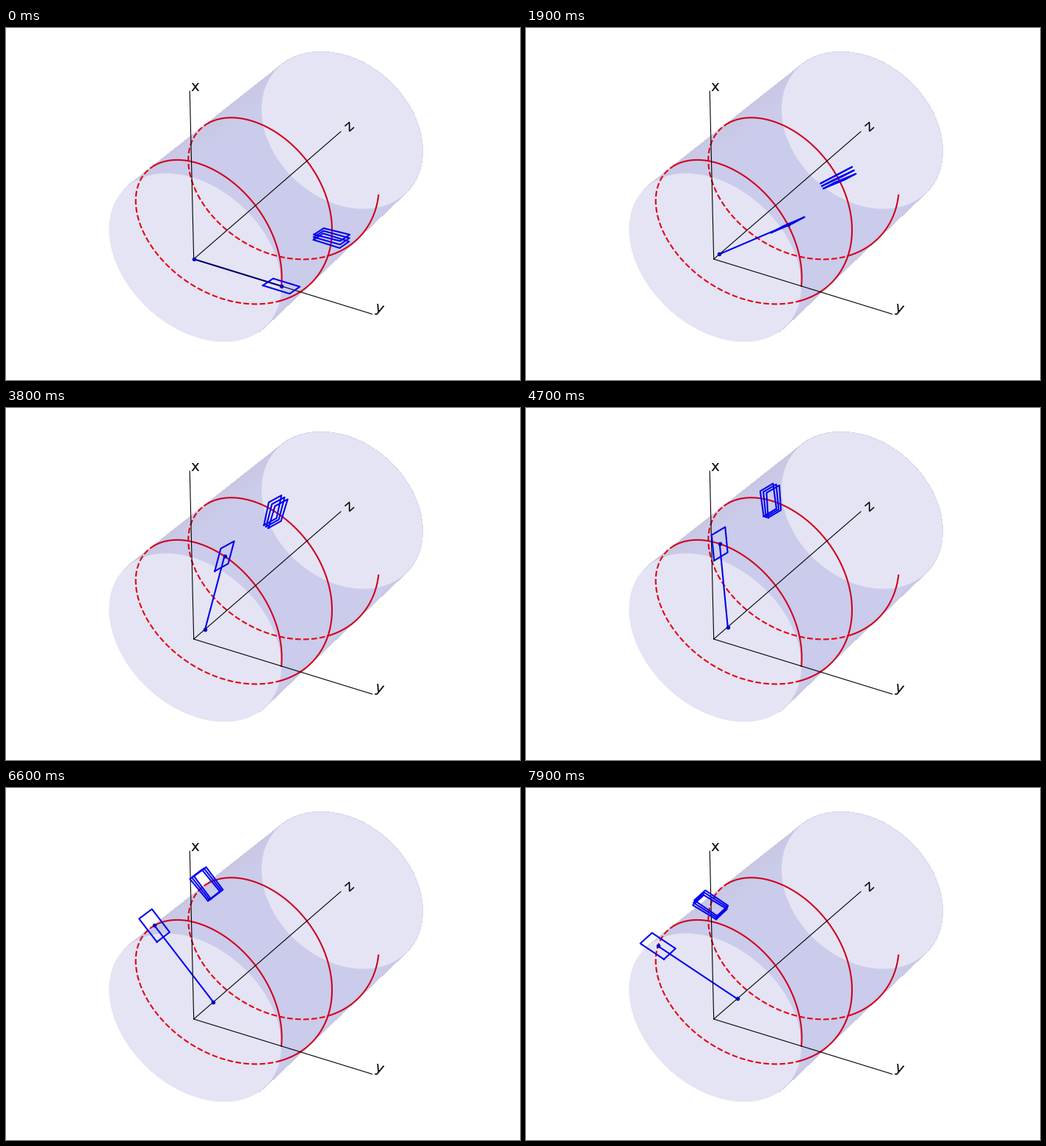
Recreate the animation shown at these times as a matplotlib script. Size 700 by 480 pixels, loop 8000 ms.

```python
import numpy as np
import matplotlib.pyplot as plt
from matplotlib.animation import FuncAnimation

W, H, DPI = 700, 480, 100
FRAMES, INTERVAL = 80, 100
SAMPLES = 360                 # points along the two-turn helix
STEP = 720 / (SAMPLES - 1)    # degrees travelled per frame
LENGTH = 3                    # cylinder length, in helix turns
PITCH = 0.1616                # rise per radian of the helix, in radii

# Perspective camera: rows give screen x, screen y and depth per unit x, y, z
ORIGIN = np.array([255.7, 315.1])
CAMERA = np.array([[-2.6, 117.27, 73.5],
                   [-109.0, 36.2, -63.8],
                   [-0.024, -0.017, 0.0337]])

WALL, EDGE = np.array([203, 203, 235]), np.array([199, 199, 226])
LIGHT = "#e4e4f4"
BLUE, DOT = "#0000f0", "#0000c4"
RED, RED_BACK = "#d0001c", "#e6000f"


def project(points):
    u, v, depth = CAMERA @ np.asarray(points, float).T
    return ORIGIN[0] + u / (1 + depth), ORIGIN[1] + v / (1 + depth)


def ring(deg, z):
    a = np.radians(deg)
    return np.column_stack([np.sin(a), np.cos(a), np.full_like(a, z)])


def helix(deg):
    deg = np.asarray(deg, float)
    a = np.radians(deg)
    return np.stack([np.sin(a), np.cos(a), deg / 360], axis=-1)


def plate(deg, half_n=0.15, half_b=0.1):
    """Closed rectangle spanned by the helix normal and binormal."""
    a = np.radians(deg)
    n = np.array([np.sin(a), np.cos(a), 0])
    b = np.array([-PITCH * np.cos(a), PITCH * np.sin(a), 1]) / np.hypot(1, PITCH)
    signs = [(-1, -1), (-1, 1), (1, 1), (1, -1), (-1, -1)]
    return np.array([helix(deg) + i * half_n * n + j * half_b * b for i, j in signs])


fig = plt.figure(figsize=(W / DPI, H / DPI), dpi=DPI, facecolor="white")
ax = fig.add_axes([0, 0, 1, 1])
ax.set_xlim(0, W)
ax.set_ylim(H, 0)
ax.axis("off")


def draw_cylinder():
    arc = np.linspace(-42, 144, 100)
    outline = np.vstack([ring(arc, 0), ring(arc[::-1], LENGTH)])
    ax.fill(*project(outline), color=WALL / 255, lw=0, zorder=1)
    # greyer towards both silhouettes
    for deg in range(-42, 144, 2):
        mix = max(np.clip((deg - 95) / 45, 0, 1), np.clip((-15 - deg) / 25, 0, 1))
        span = np.array([deg, deg + 2.3])
        quad = np.vstack([ring(span, 0), ring(span[::-1], LENGTH)])
        ax.fill(*project(quad), color=(WALL + mix * (EDGE - WALL)) / 255,
                lw=0, antialiased=False, zorder=1)
    for z in (0, LENGTH):
        ax.fill(*project(ring(np.linspace(0, 360, 241), z)), color=LIGHT, lw=0, zorder=2)


def draw_helix():
    spans = [(0, 132, True), (132, 300, False), (300, 491, True),
             (491, 660, False), (660, 720, True)]
    for start, stop, front in spans:
        ax.plot(*project(helix(np.linspace(start, stop, 160))),
                color=RED if front else RED_BACK, lw=1.5,
                ls="-" if front else "--", zorder=4 if front else 3)


def draw_axes():
    for tip in ((2, 0, 0), (0, 2, 0), (0, 0, LENGTH)):
        ax.plot(*project([(0, 0, 0), tip]), color="black", lw=0.8, zorder=6)
    for name, x, y, angle in (("x", 257, 80.5, 0), ("y", 507.5, 383, -17),
                              ("z", 467, 134, 41)):
        ax.text(x, y, name, size=14.4, family="DejaVu Sans", rotation=angle,
                ha="center", va="center", zorder=6)


draw_cylinder()
draw_helix()
draw_axes()

arm, = ax.plot([], [], color=BLUE, lw=1.5, zorder=5)
dots, = ax.plot([], [], "o", color=DOT, ms=4, mew=0, zorder=8)
# one plate on the moving point, three stacked about one turn further on
offsets = (0, 179, 180, 181)
plates = [ax.plot([], [], color=BLUE, lw=1.5, zorder=7)[0] for _ in offsets]


def update(frame):
    deg = STEP * frame
    ends = project([(0, 0, deg / 360), helix(deg)])
    arm.set_data(*ends)
    dots.set_data(*ends)
    for line, offset in zip(plates, offsets):
        line.set_data(*project(plate(STEP * (frame + offset))))
    return [arm, dots, *plates]


anim = FuncAnimation(fig, update, frames=FRAMES, interval=INTERVAL,
                     repeat=True, repeat_delay=0)
plt.show()
```
